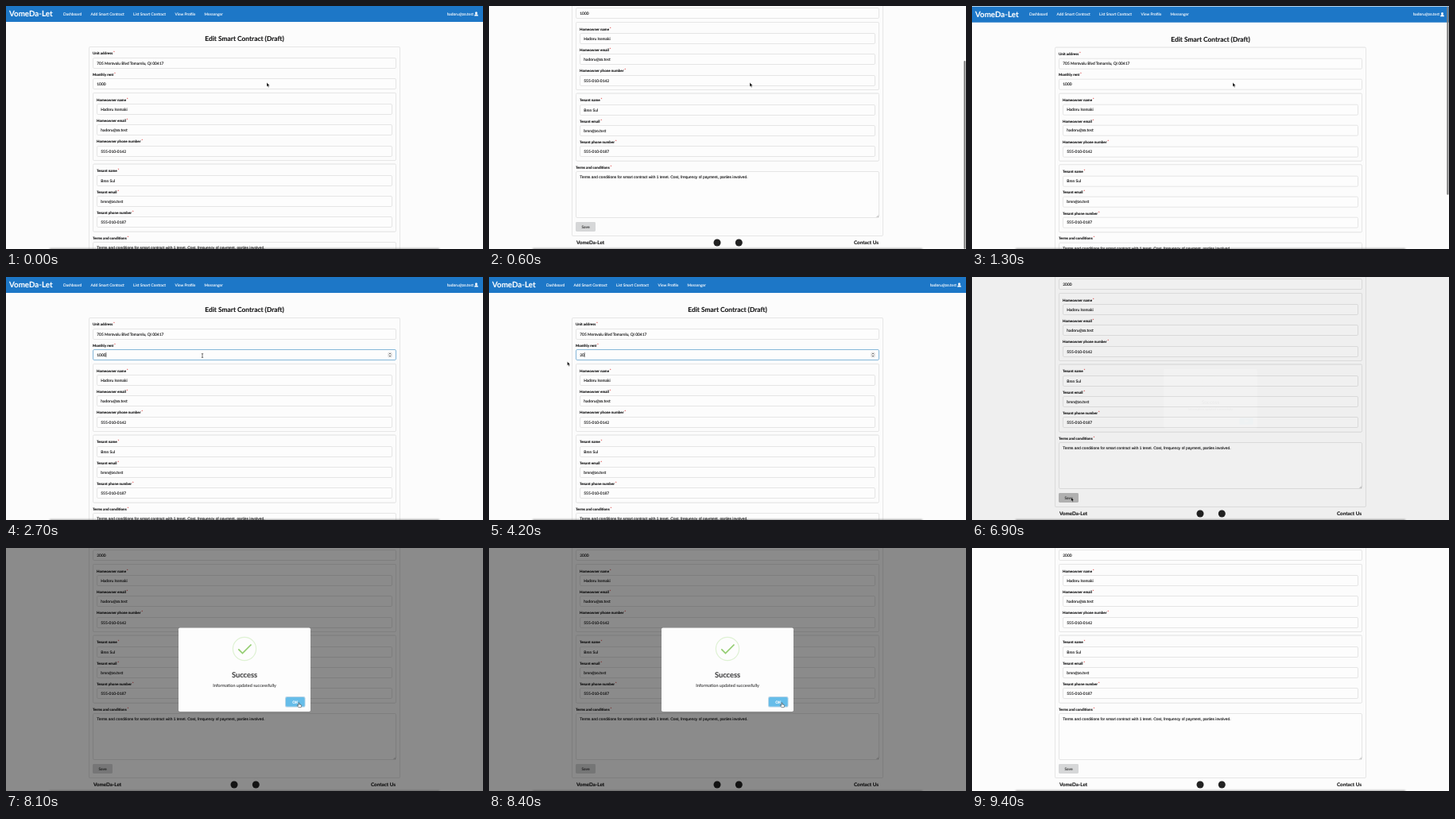
Animation, 600 px wide and 306 px high, one loop 9.9 s. Source, as an HTML page:

```html
<!DOCTYPE html>
<html lang="en">
<head>
<meta charset="utf-8">
<title>Edit Smart Contract</title>
<style>
  html, body { margin: 0; height: 100%; overflow: hidden; background: #fcfcfc; }
  svg { display: block; width: 100vw; height: 100vh; }
  text {
    --ink: #161617;
    font: 4.86px Lato, sans-serif; fill: var(--ink); stroke: var(--ink); stroke-width: .12px;
    text-rendering: geometricPrecision; white-space: pre;
  }
  .bold { font-weight: 700; }
  .label { font-size: 4.52px; font-weight: 700; }
  .star { fill: #db2828; stroke: none; }
  .nav { --ink: #f8fbfe; }
  .area { font-family: "Liberation Sans", Arial, sans-serif; }
  .mid { text-anchor: middle; }
  .end { text-anchor: end; }
  .box { fill: #fdfdfd; stroke: #e5e5e5; }
  .seg { fill: #fcfcfc; stroke: #e6e6e6; filter: drop-shadow(0 .6px .5px rgba(34, 36, 38, .1)); }
  .dock { fill: #444; opacity: .6; filter: blur(1.2px); }
</style>
</head>
<body>
<svg id="stage" viewBox="0 0 600 306" preserveAspectRatio="none"></svg>
<script>
const LOOP = 9900, MAX_SCROLL = 89, OPEN = 6845, CLOSE = 8400;

const text = (x, y, str, cls = '', size = '', attrs = '') =>
  `<text x="${x}" y="${y}" class="${cls}"${size && ` style="font-size:${size}px"`} ${attrs}>${str}</text>`;
const rect = (x, y, w, h, attrs) =>
  `<rect x="${x}" y="${y}" width="${w}" height="${h}" ${attrs}/>`;
const label = (x, y, str) =>
  text(x, y + 1.6, `${str}<tspan class="star" dx=".8" dy="-1">*</tspan>`, 'label');

// A label with its one-line input below; y is the middle of the label.
function field(x, y, name, value, attrs = '') {
  const top = Math.floor(y + 5.4) + .5;
  return label(x, y, name) +
    rect(x + .5, top, 599 - 2 * x, 13, `rx="1.4" class="box" ${attrs}`) +
    text(x + 5.3, top + 8.2, value);
}

const person = (top, role, name, mail, phone) =>
  rect(109.5, top - 8.5, 381, 85, 'rx="1.4" class="seg"') +
  field(114, top, role + ' name', name) +
  field(114, top + 26.4, role + ' email', mail) +
  field(114, top + 52.8, role + ' phone number', phone);

const menu = [[72, 'Dashboard'], [106.5, 'Add Smart Contract'], [160, 'List Smart Contract'],
  [212.5, 'View Profile'], [249.5, 'Messenger']];

const page = `
  ${rect(0, 0, 600, 20, 'fill="#1d77c7"')}
  ${text(4, 13.3, 'VomeDa-Let', 'nav bold', 9.8)}
  ${menu.map(([x, s]) => text(x, 11.7, s, 'nav')).join('')}
  ${text(588, 11.7, 'hadoru@zo.test', 'nav end')}
  <path d="M589 12.5q0-2.3 2.5-2.3t2.5 2.3z" fill="#fff"/><circle cx="591.5" cy="8.8" r="1.5" fill="#fff"/>
  ${text(300, 44.2, 'Edit Smart Contract (Draft)', 'bold mid', 8.4)}
  ${rect(104.5, 51.5, 391, 327, 'rx="1.4" class="seg"')}
  <g id="form">
    ${field(109, 59.7, 'Unit address', '705 Merovalu Blvd Tomarelu, QI 00417')}
    ${field(109, 86.1, 'Monthly rent', '', 'id="rentBox"')}
    ${rect(114, 95, 11.8, 6, 'id="selection" fill="#b3d7ff"')}
    ${text(114.3, 99.7, '1000', '', '', 'id="amount"')}
    <path id="caret" d="M0 95v6" stroke="#111" stroke-width=".6"/>
    <g id="spinner">${rect(480.7, 95, 4.6, 6, 'rx="1.3" fill="#f2f2f2" stroke="#bbb" stroke-width=".4"')}
      <path d="M481.8 97.3l1.2-1.3 1.2 1.3M481.8 98.8l1.2 1.3 1.2-1.3" fill="none" stroke="#333" stroke-width=".7"/></g>
    ${person(118, 'Homeowner', 'Hadoru Isemaki', 'hadoru@zo.test', '555-010-0142')}
    ${person(207.6, 'Tenant', 'Bren Sul', 'bren@zo.test', '555-010-0187')}
    ${label(109, 292.2, 'Terms and conditions')}
    ${rect(109.5, 297.5, 381, 58, 'rx="1.4" class="box"')}
    ${text(114.3, 306, 'Terms and conditions for smart contract with 1 tenet. Cost, frequency of payment, parties involved.', 'area')}
    <path d="M487.5 355l2.5-2.5M489 355l1-1" stroke="#777" stroke-width=".5"/>
    ${rect(109, 361, 25, 12, 'rx="1.4" id="save"')}
    ${text(121.5, 368.8, 'Save', 'bold mid', '', 'opacity=".7"')}
  </g>
  ${text(110, 388.8, 'VomeDa-Let', 'bold', 6.3)}
  <circle cx="287" cy="387" r="4.5" fill="#222"/><circle cx="314.3" cy="387" r="4.5" fill="#222"/>
  ${text(490, 388.8, 'Contact Us', 'bold end', 6.3)}`;

const modal = `
  ${rect(217, 100.5, 166, 105.5, 'rx="1.8" fill="#fdfdfd"')}
  <circle cx="300" cy="127" r="14.6" fill="none" stroke="#a5dc86" stroke-opacity=".35" stroke-width="1.2"/>
  <path id="check" d="M292.3 127.3l5.2 5.2 11-11" fill="none" stroke="#93cd70" stroke-width="1.7"
    pathLength="1" stroke-dasharray="1 2"/>
  ${text(300, 162.8, 'Success', 'bold mid', 9.3, 'opacity=".8"')}
  ${text(300, 174.9, 'Information updated successfully', 'mid', 5.5, 'opacity=".8"')}
  ${rect(351.1, 187, 25.4, 13.6, 'rx="2.2" fill="#b4d2e6"')}
  ${rect(352, 188, 23.6, 11.6, 'rx="1.7" id="ok"')}
  ${text(363.8, 195.7, 'OK', 'nav bold mid')}`;

const stage = document.getElementById('stage');
stage.innerHTML = `
  ${rect(0, 0, 600, 306, 'fill="#fcfcfc"')}
  <g id="page">${page}</g>
  ${rect(597.3, 0, 2.2, 237, 'rx="1.1" fill="#7c7c7c" id="thumb"')}
  <g id="overlay">${rect(0, 0, 600, 306, 'opacity=".45"')}<g id="modal">${modal}</g></g>
  ${rect(55, 305.4, 490, 4, 'class="dock"')}
  <g id="cursor">
    <path id="arrow" d="M0 0v5l1.2-1 .8 1.9.9-.4-.8-1.8h1.6z" fill="#000" stroke="#fff" stroke-width=".35"/>
    <path id="beam" d="M-1.2-2.6Q0-2.6 0-1.8Q0-2.6 1.2-2.6M0-2v4M-1.2 2.6Q0 2.6 0 1.8Q0 2.6 1.2 2.6" fill="none" stroke="#222" stroke-width=".6"/>
    <path id="hand" d="M-.6 0q.6-.6 1.1 0v2l2.2.5q.7.3.5 1.2l-.6 2h-3L-2.2 3.4q0-.8.8-.5l.8.6z" fill="#fff" stroke="#111" stroke-width=".45"/>
  </g>`;

const el = id => document.getElementById(id);
const set = (id, name, value) => el(id).setAttribute(name, value);
const show = (id, on) => set(id, 'visibility', on ? 'visible' : 'hidden');

// Eased value at time t on a track of [time, value, value...] keys.
function track(t, keys, col = 1) {
  const i = keys.findIndex(k => k[0] > t);
  if (i === 0) return keys[0][col];
  if (i < 0) return keys[keys.length - 1][col];
  const a = keys[i - 1], b = keys[i], u = (t - a[0]) / (b[0] - a[0]);
  return a[col] + (b[col] - a[col]) * u * u * (3 - 2 * u);
}

const scrollKeys = [[150, 0], [600, MAX_SCROLL], [700, MAX_SCROLL], [1150, 0], [1300, -.7], [1500, 0],
  [5565, 0], [6250, MAX_SCROLL]];
const thumbKeys = [[100, 0], [170, 1], [1400, 1], [1900, 0], [5600, 0], [5700, 1], [6350, 1], [6600, 0]];
const cursorKeys = [[2050, 328, 96.5], [2250, 247, 99], [2850, 247, 99], [3800, 98.5, 106.5],
  [6250, 98.5, 106.5], [6650, 124.7, 277.5], [7100, 124.7, 277.5], [7900, 330, 195], [8080, 368.5, 195],
  [8700, 368.5, 195], [9230, 345, 84], [9340, 480, 8], [9390, 495, -12]];
const scaleKeys = [[0, .5], [135, 1.05], [240, .95], [300, 1]];
const overlayKeys = [[OPEN, 0], [OPEN + 260, 1], [CLOSE, 1], [CLOSE + 300, 0]];
const modalKeys = [[OPEN, 0], [OPEN + 150, 1]];
const checkKeys = [[OPEN + 300, 1], [OPEN + 700, 0]];
const typing = [[4050, '2'], [4200, '20'], [4450, '200'], [4650, '2000']];

function draw(t) {
  const scroll = track(t, scrollKeys);
  set('page', 'transform', `translate(0 ${-scroll})`);
  set('thumb', 'y', Math.max(.8, scroll * 306 / 395));
  set('thumb', 'opacity', track(t, thumbKeys));

  const x = track(t, cursorKeys), y = track(t, cursorKeys, 2);
  const kind = t > 2100 && t < 3700 ? 'beam' : t > 8030 && t < 8800 ? 'hand' : 'arrow';
  set('cursor', 'transform', `translate(${x} ${y})`);
  for (const id of ['arrow', 'beam', 'hand']) show(id, id === kind);

  const typed = typing.filter(k => k[0] <= t).pop();
  const amount = typed ? typed[1] : '1000';
  const focus = t >= 2500 && t < 6700;
  const selStart = Math.min(126, Math.max(114.3, x));
  const selecting = t > 2850 && !typed && selStart < 126;
  const since = t - (typed ? typed[0] : 2500);
  el('amount').textContent = amount;
  el('rentBox').style.stroke = focus ? '#85b7d9' : '';
  show('spinner', focus);
  show('selection', selecting);
  set('selection', 'x', selStart);
  set('selection', 'width', 126 - selStart);
  show('caret', focus && !selecting && since % 1000 < 500);
  set('caret', 'transform', `translate(${114.5 + amount.length * 2.83} 0)`);
  set('save', 'fill', t >= 6700 && t < 7100 ? '#bababa' : t > 6600 && t < 7300 ? '#cacbcd' : '#d6d7d8');

  set('overlay', 'opacity', track(t, overlayKeys));
  set('modal', 'opacity', track(t, modalKeys));
  set('modal', 'transform', `translate(300 153) scale(${track(t - OPEN, scaleKeys)}) translate(-300 -153)`);
  set('check', 'stroke-dashoffset', track(t, checkKeys));
  show('check', t > OPEN + 300 && t < CLOSE + 300);
  set('ok', 'fill', t > 8030 ? '#66bde9' : '#7cd1f9');
}

const start = performance.now();
(function tick() {
  draw((performance.now() - start) % LOOP);
  requestAnimationFrame(tick);
})();
</script>
</body>
</html>
```
